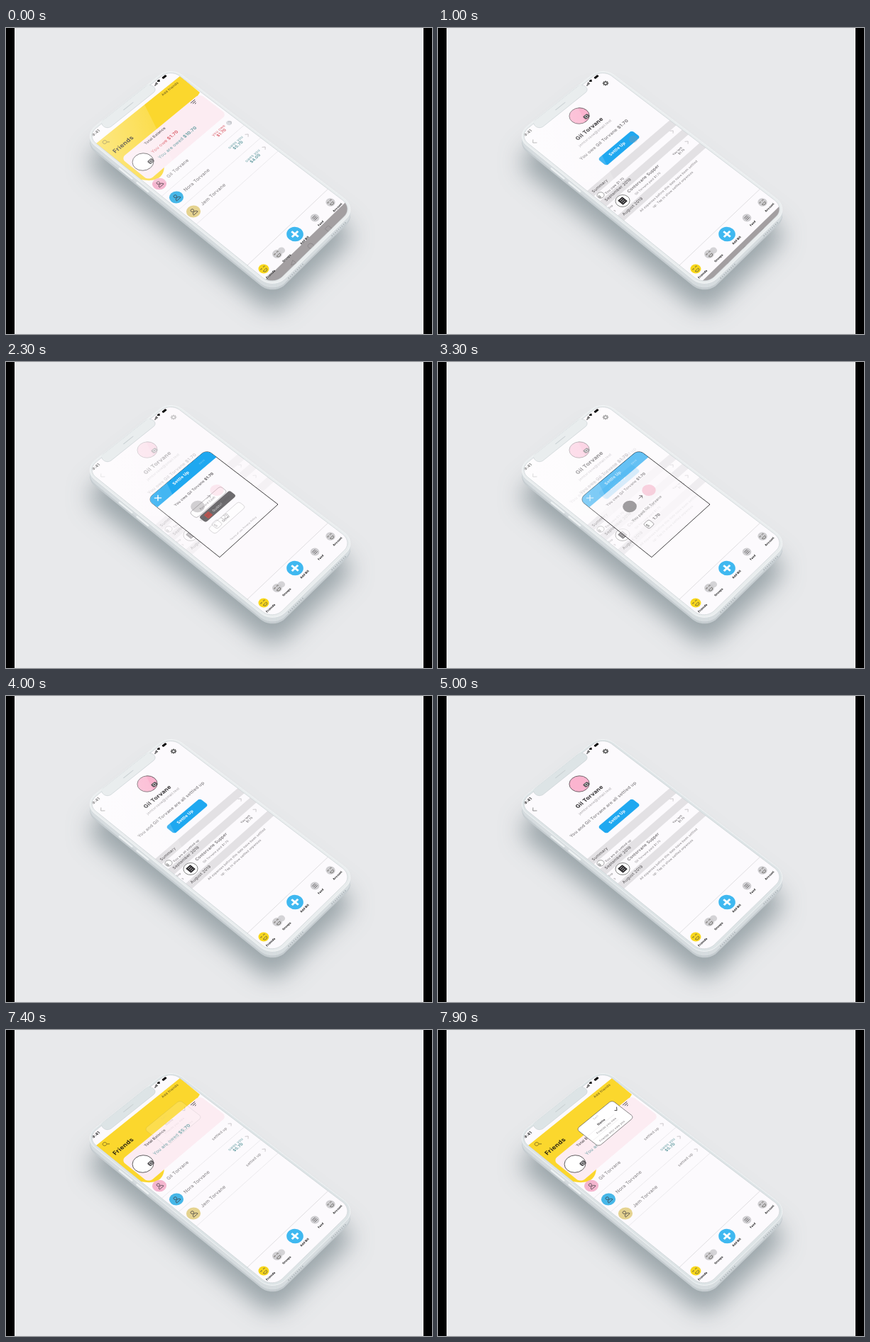
An HTML page with a canvas for the animation above (8000 ms loop, 600x432 px).

```html
<!DOCTYPE html>
<html lang="en">
<head>
<meta charset="utf-8">
<title>Bill splitting app</title>
<style>
html, body { margin: 0; width: 600px; height: 432px; overflow: hidden; background: #e8e9eb; }
canvas { display: block; }
</style>
</head>
<body>
<canvas id="stage" width="600" height="432"></canvas>
<script>
const ctx = document.getElementById('stage').getContext('2d');
const LOOP = 8000, W = 375, H = 715, BOTTOM = 758;
const GREY = '#7d7a7d', DARK = '#2b292b', RED = '#dd6670', TEAL = '#679fa3', BLUE = '#1fa8f0', PAPER = '#fcfafd';
const BEN = 'Gil Torvane', ALEX = 'Nora Torvane', TOM = 'Jem Torvane';

// Perspective of the phone screen, from four points on the glass
const [A, B, C, D] = [[127, 163], [245, 68], [474, 243], [361, 352]];
const sx = A[0] - B[0] + C[0] - D[0], sy = A[1] - B[1] + C[1] - D[1];
const x1 = B[0] - C[0], y1 = B[1] - C[1], x2 = D[0] - C[0], y2 = D[1] - C[1];
const den = x1 * y2 - x2 * y1;
const g = (sx * y2 - x2 * sy) / den, h = (x1 * sy - sx * y1) / den;
const ux = B[0] - A[0] + g * B[0], uy = B[1] - A[1] + g * B[1];
const vx = D[0] - A[0] + h * D[0], vy = D[1] - A[1] + h * D[1];

function project(x, y) {
  const u = x / W, v = y / H, w = 1 + g * u + h * v;
  return [(ux * u + vx * v + A[0]) / w, (uy * u + vy * v + A[1]) / w];
}

function unproject(x, y) {
  const a = ux - g * x, b = vx - h * x, c = uy - g * y, d = vy - h * y;
  const p = x - A[0], q = y - A[1], k = a * d - b * c;
  return [(p * d - b * q) / k * W, (a * q - p * c) / k * H];
}

// Draw in screen units around a stage point
function at(x, y, fn) {
  const [lx, ly] = unproject(x, y), w = 1 + g * lx / W + h * ly / H;
  ctx.save();
  ctx.transform((ux - g * x) / w / W, (uy - g * y) / w / W, (vx - h * x) / w / H, (vy - h * y) / w / H, x, y);
  fn();
  ctx.restore();
}

function fade(a, fn) {
  if (a <= 0) return;
  ctx.save();
  ctx.globalAlpha *= a;
  fn();
  ctx.restore();
}

function paint(fill, stroke, width = 1) {
  if (fill) { ctx.fillStyle = fill; ctx.fill(); }
  if (stroke) { ctx.strokeStyle = stroke; ctx.lineWidth = width; ctx.stroke(); }
}

// Rounded rectangle on the glass, in perspective
function plane(l, t, r, b, rad = 0, low = rad) {
  ctx.beginPath();
  const corners = [[l, t, 1, 1, rad], [r, t, -1, 1, rad], [r, b, -1, -1, low], [l, b, 1, -1, low]];
  corners.forEach(([x, y, dx, dy, q], i) => {
    for (let s = 0; s <= 10; s++) {
      const a = Math.PI * (1 + i / 2 + s / 20);
      ctx.lineTo(...project(x + dx * q + q * Math.cos(a), y + dy * q + q * Math.sin(a)));
    }
  });
  ctx.closePath();
}

function box(tl, br, rad, low) {
  plane(...unproject(...tl), ...unproject(...br), rad, low);
}

function rule(x, y, color) {
  const row = unproject(x, y)[1];
  ctx.beginPath();
  ctx.moveTo(...project(0, row));
  ctx.lineTo(...project(W, row));
  paint(null, color, 0.7);
}

// The part after "|" is bold
function text(str, x, y, size, color = DARK, weight = 400, align = 'left') {
  at(x, y, () => {
    ctx.fillStyle = color;
    ctx.textAlign = align;
    ctx.letterSpacing = size * 0.03 + 'px';
    let pos = 0;
    str.split('|').forEach((part, i) => {
      ctx.font = `${i ? 700 : weight} ${size}px Inter, "Open Sans", sans-serif`;
      ctx.fillText(part, pos, 0);
      pos += ctx.measureText(part).width;
    });
  });
}

function disc(x, y, r, fill, stroke, width) {
  at(x, y, () => {
    ctx.beginPath();
    ctx.arc(0, 0, r, 0, 7);
    paint(fill, stroke, width);
  });
}

function pill(x, y, w, hgt, r, fill, stroke, width) {
  at(x, y, () => {
    ctx.beginPath();
    ctx.roundRect(-w / 2, -hgt / 2, w, hgt, r);
    paint(fill, stroke, width);
  });
}

// Polylines in screen units: "x,y x,y;x,y x,y"
function strokes(x, y, d, color, width) {
  at(x, y, () => {
    ctx.beginPath();
    d.split(';').forEach(line => line.split(' ').forEach((p, i) => {
      const [px, py] = p.split(',').map(Number);
      i ? ctx.lineTo(px, py) : ctx.moveTo(px, py);
    }));
    paint(null, color, width);
  });
}

const chevron = (x, y) => strokes(x, y, '-4,-7 4,0 -4,7', '#b5b2b5', 1.6);

function camera(x, y) {
  pill(x, y, 19, 15, 4, '#555356');
  disc(x, y, 4.5, '#555356', '#fff', 1.6);
}

function person(x, y, color) {
  disc(x, y, 22, color);
  at(x, y, () => {
    ctx.beginPath();
    ctx.arc(0, -5, 5, 0, 7);
    ctx.moveTo(-9, 10);
    ctx.quadraticCurveTo(-9, 2, 0, 2);
    ctx.quadraticCurveTo(9, 2, 9, 10);
    ctx.closePath();
    paint(null, '#3f3b40', 1.7);
  });
}

function face(x, y, r, color) {
  disc(x, y, r, color);
  at(x, y, () => {
    ctx.beginPath();
    for (const e of [-6, 6]) {
      ctx.moveTo(e - 3, -3);
      ctx.arc(e, -3, 3, Math.PI, 0);
    }
    ctx.moveTo(7, 4);
    ctx.arc(0, 4, 7, 0, Math.PI);
    ctx.closePath();
    paint(null, '#4c4a42', 1.5);
  });
}

function touch(x, y, r, a) {
  fade(a, () => disc(x, y, r, 'rgba(140,150,160,.3)'));
}

function paper() {
  plane(-5, -50, W + 5, 780);
  paint(PAPER);
}

function amount(word, sum, x, y, color) {
  text(word, x, y, 13.5, color);
  text(sum, x + 7, y + 1, 14, color, 700);
}

function friends(settled, search) {
  paper();
  ctx.beginPath();
  ctx.moveTo(...A);
  ctx.lineTo(...B);
  ctx.lineTo(273, 91);
  ctx.quadraticCurveTo(235, 150, 223, 195);
  ctx.quadraticCurveTo(222, 220, 190, 214);
  ctx.closePath();
  paint('#fbd72d');
  box([162, 184], [311, 122], 18);
  paint('#fcecf2');

  text('Add friends', 221, 96, 12.5, '#5b4f22');
  text('Friends', 154, 177, 21, '#2c2614', 700);
  if (search) {
    disc(139, 161, 6.5, null, '#6a5a1c', 1.6);
    strokes(139, 161, '5,5 11,11', '#6a5a1c', 1.8);
  }
  strokes(265, 105, '-10,-6 10,-6;-7,0 7,0;-3,6 3,6', DARK, 2);
  text('Total Balance', 197, 165, 13, '#4a4548', 500);
  if (settled) text('You are owed |$5.70', 210, 177, 15.7, TEAL);
  else {
    text('You owe |$1.70', 207, 177, 15.5, RED);
    text('You are owed |$10.70', 217, 185, 15.5, TEAL);
  }
  disc(193, 189, 33, '#fff', '#4c4a4c', 2);
  camera(204, 188);

  person(216, 220, '#f4b6cf');
  person(240, 239, '#46b7e8');
  person(264, 259, '#e5d390');
  text(BEN, 229, 212, 16, GREY);
  text(ALEX, 253, 231, 16, GREY);
  text(TOM, 277, 251, 16, GREY);
  for (const [x, y] of [[228, 230], [252, 249], [276, 270]]) rule(x, y, '#e4e2e5');
  if (settled) {
    text('settled up', 292, 156, 13, GREY);
    text('settled up', 340, 193, 13, GREY);
  } else {
    amount('you owe', '$1.70', 292, 153, RED);
    amount('owes you', '$4.00', 339, 190, TEAL);
  }
  amount('owes you', '$5.70', 315, 171, TEAL);
  for (const [x, y] of [[316, 133], [340, 151], [364, 169]]) chevron(x, y);
}

function band(from, to, label, x, y) {
  const rowAt = q => unproject(q, 163 + 0.807 * (q - 127))[1];
  plane(-5, rowAt(from), W + 5, rowAt(to));
  paint('#e3e1e4');
  text(label, x, y, 13.5, '#4c494c');
}

function gear(x, y) {
  at(x, y, () => {
    ctx.beginPath();
    for (let i = 0; i < 8; i++) {
      const a = i * Math.PI / 4;
      ctx.moveTo(6 * Math.cos(a), 6 * Math.sin(a));
      ctx.lineTo(10 * Math.cos(a), 10 * Math.sin(a));
    }
    paint(null, '#555', 4);
    ctx.beginPath();
    ctx.arc(0, 0, 5.5, 0, 7);
    paint(null, '#555', 3.5);
  });
}

function profile(paid) {
  paper();
  strokes(135, 161, '5,-9 -4,0 5,9', '#777', 1.8);
  gear(236, 78);
  disc(199, 124, 32, '#fbb4cf', '#5f565b', 2);
  camera(209, 125);
  text(BEN, 197, 159, 19.5, DARK, 700);
  text('jemtorvane@zmail.test', 200, 168, 12.3, '#a19ea1');
  fade(1 - paid, () => text(`You owe ${BEN} |$1.70`, 202, 187, 15.5, GREY, 500));
  fade(paid, () => text(`You and ${BEN} are all settled up`, 188, 200, 15, GREY, 500));
  box([225, 185], [285, 154], 9);
  paint(BLUE);
  text('Settle Up', 243, 181, 14.5, '#fff', 700);

  band(210, 219.5, 'Summary', 219, 233);
  disc(229, 236, 11, '#fff', '#777', 1.5);
  text('$', 229, 239, 12, '#555', 500, 'center');
  fade(1 - paid, () => text('You owe $1.70', 237, 235, 11, '#5c595c'));
  fade(paid, () => text('You are all settled up', 237, 235, 10.5, '#5c595c'));
  chevron(330, 146);

  band(228, 237, 'September 2019', 237, 245);
  text('Sep', 244, 253, 9, GREY, 400, 'center');
  text('3', 250, 259, 9, GREY, 400, 'center');
  disc(260, 244, 22, '#fff', '#555', 1.6);
  pill(260, 244, 20, 23, 2, '#29272a');
  strokes(260, 244, '-6,-6 6,-6;-6,0 6,0;-6,6 6,6', '#fff', 1.6);
  text('Contorvane Supper', 269, 233, 14, '#4c494c');
  text(`${BEN} paid $1.70`, 279, 236, 10, GREY);
  text('You lent', 332, 180, 10, '#4c494c');
  text('$1.70', 340, 179, 10, '#4c494c');
  chevron(351, 161);

  band(253, 262, 'August 2019', 262, 265);
  text('All expenses before this date have been settled', 286, 260, 10.6, GREY);
  text('up. Tap to show settled expenses', 304, 254, 10.6, GREY);
}

function options() {
  pill(285, 198, 140, 30, 9, '#fff', '#7b787b', 1.6);
  text('Record Cash', 285, 200, 10.5, '#5f5c5f', 400, 'center');
  pill(298, 204, 140, 30, 9, '#2b292c');
  pill(285, 216, 20, 20, 2, '#df4a43');
  text('Quibto!', 299, 206, 11.5, '#fff', 500, 'center');
  pill(311, 220, 140, 30, 9, '#fff', '#a9a6a9', 1.4);
  text('Other', 311, 222, 11, '#4c494c', 500, 'center');
  text('Terms of use Privacy Policy', 317, 252, 8.4, '#7b787b');
}

function payment() {
  disc(270, 204, 22, '#747174');
  strokes(285, 191, '-8,0 8,0;2,-7 8,0 2,7', DARK, 2);
  disc(297, 181, 22, '#f7bdd1');
  text(`You paid ${BEN}`, 275, 226, 12.5, '#555');
  pill(297, 229, 25, 25, 6, '#fff', '#4c494c', 1.6);
  text('$', 297, 232, 15, DARK, 400, 'center');
  text('1.70', 305, 223, 13.5, DARK, 600);
}

function settle(shown, step) {
  const [l, t] = unproject(199, 194), [r, b] = unproject(383, 201);
  fade(shown, () => {
    plane(l, t, r, b, 22, 0);
    paint(PAPER);
  });
  fade(Math.min(1, shown * 3), () => {
    plane(l, t, r, b, 22, 0);
    paint(null, '#2d2b2d', 0.9);
  });
  fade(shown, () => {
    ctx.save();
    plane(l, t, r, b, 22, 0);
    ctx.clip();
    plane(l - 2, t - 2, r + 2, t + 44);
    paint(BLUE);
    ctx.restore();
    strokes(214, 192, '-8,-8 8,8;-8,8 8,-8', '#fff', 3.2);
    text('Settle Up', 237, 174, 14.5, '#fff', 700);
    fade(0.2 + 0.6 * step, () => text('save', 273, 145, 10.5, '#fff'));
    text(`You owe ${BEN} |$1.70`, 239, 204, 12.7, '#4c494c');
    fade(1 - step, options);
    fade(step, payment);
  });
}

function sortMenu() {
  box([195, 140], [276, 123], 12);
  paint('#fff', '#555', 0.7);
  text('Sort', 220, 127, 10, '#b5b2b5');
  text('Name', 226, 135, 11, DARK, 600);
  strokes(251, 112, '-7,-1 -2,5 8,-6', DARK, 2);
  text('Friends you owe', 225, 147, 10.4, GREY);
  text('Friends who owe you', 229, 158, 10.4, GREY);
  for (const [x, y] of [[229, 135], [235, 142]]) strokes(x, y, '-60,0 62,0', '#e0dee0', 1);
}

function tabs(slide) {
  const top = unproject(340, 335)[1];
  plane(-5, top, W + 5, 785);
  paint(PAPER);
  rule(340, 335, '#d3d1d4');
  if (slide < 50) {
    plane(-5, H + slide, W + 5, 785 + slide);
    paint('#a39fa1');
    const y = 739 + slide;
    strokes(...project(98, y), '8,-8 -8,0 8,8 8,-8', '#8a8688', 1.8);
    disc(...project(181, y), 9, null, '#8a8688', 1.8);
    pill(...project(265, y), 16, 16, 2, null, '#8a8688', 1.8);
  }
  face(363, 340, 16, '#f8d71c');
  disc(388, 314, 11, '#d4d3d6');
  face(382, 319, 15, '#cfced1');
  disc(407, 291, 26, '#3fb8f0');
  strokes(407, 291, '-14,0 14,0;0,-14 0,14', '#fff', 6.5);
  disc(435, 268, 14, '#cfced1');
  strokes(435, 268, '-7,-5 7,-5;-7,0 7,0;-7,5 7,5', '#4c4a4c', 1.7);
  face(457, 246, 15, '#cfced1');
  text('Friends', 368, 354, 9.6, '#111', 700);
  text('Groups', 391, 331, 9.4, '#111', 700);
  text('Add Bill', 416, 306, 9.4, '#111', 700);
  text('Feed', 441, 280, 9.4, '#111', 700);
  text('Account', 462, 260, 9.4, '#111', 700);
}

function statusBar() {
  text('9:41', 123, 153, 14, '#111', 600);
  at(210, 79, () => {
    ctx.fillStyle = '#111';
    for (let i = 0; i < 4; i++) ctx.fillRect(i * 3.6 - 6, 3 - i * 2, 2.4, 3 + i * 2);
  });
  at(215.5, 75, () => {
    ctx.beginPath();
    ctx.moveTo(0, 4);
    ctx.arc(0, 4, 9.5, -2.3, -0.84);
    ctx.closePath();
    paint('#111');
  });
  pill(223, 69, 17, 8, 2.5, '#111');
}

// Diagonal reflection on the upper left of the glass
function glare() {
  const shine = ctx.createLinearGradient(125, 160, 210, 140);
  shine.addColorStop(0, 'rgba(255,255,255,.42)');
  shine.addColorStop(1, 'rgba(255,255,255,.16)');
  ctx.beginPath();
  ctx.moveTo(100, 70);
  ctx.lineTo(176, 70);
  ctx.lineTo(250, 218);
  ctx.lineTo(100, 218);
  paint(shine);
}

function phone(tone) {
  const edge = () => plane(-8, -51, W + 8, BOTTOM + 10, 52);
  ctx.save();
  ctx.shadowColor = 'rgba(120,134,140,.68)';
  ctx.shadowBlur = 32;
  ctx.shadowOffsetY = 37;
  edge();
  paint('#c9d0d3');
  ctx.restore();
  for (let i = 9; i >= 0; i--) {
    ctx.save();
    ctx.translate(0, i);
    edge();
    paint(i > 6 ? '#c5ccd0' : i ? '#d6dcdf' : tone);
    ctx.restore();
  }
  edge();
  paint(null, '#f4f7f8', 0.9);
  for (const start of [60, 262]) {
    for (let x = start; x < start + 72; x += 8) {
      const [px, py] = project(x, BOTTOM + 10);
      ctx.beginPath();
      ctx.arc(px, py + 4.5, 0.9, 0, 7);
      paint('#aab2b6');
    }
  }
  for (const [a, b] of [[112, 172], [190, 243]]) {
    const [px, py] = project(-9, a), [qx, qy] = project(-9, b);
    ctx.beginPath();
    ctx.moveTo(px, py + 4);
    ctx.lineTo(qx, qy + 4);
    paint(null, '#edf1f2', 2.4);
  }
}

function notch(tone) {
  plane(62, -50, 284, -14, 17);
  paint(tone, '#c3cbce', 0.6);
  plane(0, -44, W, BOTTOM, 42);
  paint(null, '#c9d0d3', 0.7);
  plane(66, -50, 280, -40);
  paint(tone);
  const [x, y] = project(172, -33);
  strokes(x, y, '-22,0 22,0', '#c9d0d3', 2.5);
}

function ease(t, from, to) {
  const p = Math.min(1, Math.max(0, (t - from) / (to - from)));
  return p * p * (3 - 2 * p);
}

function draw(t) {
  const shiny = t < 4700, tone = shiny ? '#e9edee' : '#dde4e6';
  const open = ease(t, 200, 600), back = ease(t, 5600, 6000);
  const paid = ease(t, 3150, 3550);
  const shown = ease(t, 1200, 1600) * (1 - paid);

  ctx.fillStyle = '#e8e9eb';
  ctx.fillRect(0, 0, 600, 432);
  phone(tone);

  ctx.save();
  plane(0, -44, W, BOTTOM, 42);
  ctx.clip();
  if (open < 1) friends(false, true);
  if (back < 1) fade(open, () => profile(paid));
  fade(back, () => friends(true, t >= 6200));
  touch(314, 134, 9, 1 - ease(t, 100, 400));
  touch(275, 157, 14, ease(t, 700, 900) * (1 - ease(t, 1050, 1300)));
  fade(shown * 0.68, paper);
  tabs(12 + 46 * (t / 1800) ** 2);
  statusBar();
  if (shown > 0) settle(shown, ease(t, 2150, 2550));
  fade(ease(t, 7300, 7700), sortMenu);
  if (shiny) glare();
  ctx.restore();

  notch(tone);
  ctx.fillStyle = '#000';
  ctx.fillRect(0, 0, 12, 432);
  ctx.fillRect(588, 0, 12, 432);
}

const begin = performance.now();
function tick() {
  const t = (performance.now() - begin) % LOOP;
  draw(Math.floor(t / 100) * 100);
  requestAnimationFrame(tick);
}
tick();
</script>
</body>
</html>
```
